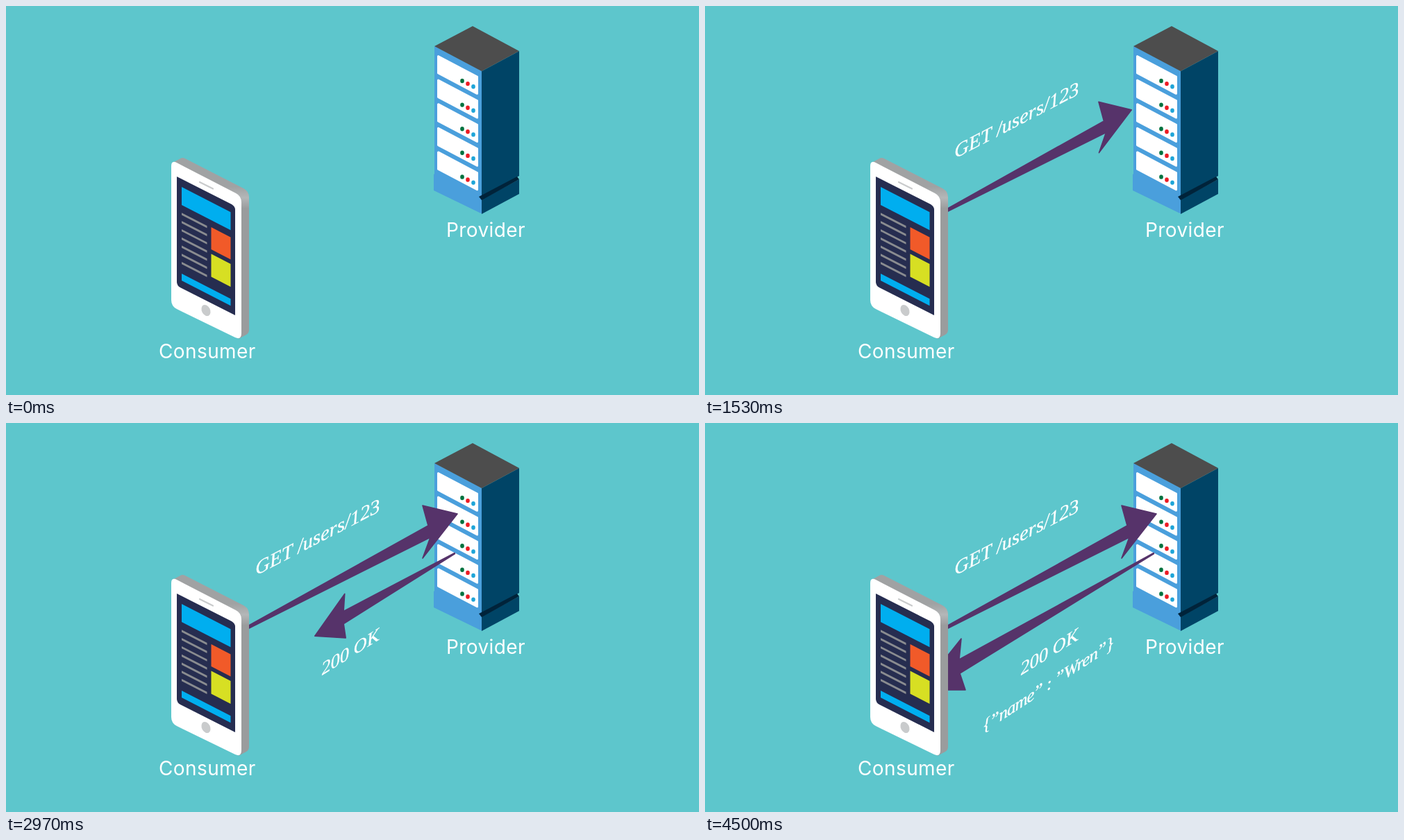
Animation, 998 px wide and 561 px high, one loop 5400 ms. Source, as an HTML page:

```html
<!DOCTYPE html>
<html lang="en">
<head>
<meta charset="utf-8">
<title>Consumer and provider</title>
<style>
  html, body { margin: 0; height: 100%; overflow: hidden; background: #5dc6cc; }
  svg { display: block; width: 100%; height: 100%; }
  .label { font: 400 28px Inter, sans-serif; letter-spacing: .4px; fill: #fff; }
  .note {
    font-family: "Liberation Serif", serif; font-style: italic; white-space: pre;
    fill: #fff; stroke: #fff; stroke-width: .35;
  }
  .arrow { fill: #56336a; stroke: #56336a; stroke-width: 1.6; stroke-linejoin: round; }
</style>
</head>
<body>
<svg viewBox="0 0 998 561">
  <defs>
    <linearGradient id="edge" x1="0" y1="0" x2="0" y2="1">
      <stop offset="0" stop-color="#a0a2a3"/>
      <stop offset=".16" stop-color="#a0a2a3"/>
      <stop offset=".22" stop-color="#b4b7b8"/>
      <stop offset=".28" stop-color="#9a9c9d"/>
      <stop offset="1" stop-color="#9a9c9d"/>
    </linearGradient>
    <clipPath id="clip0"><rect y="0" height="561"/></clipPath>
    <clipPath id="clip1"><rect y="0" height="561"/></clipPath>
    <clipPath id="clip2"><rect y="0" height="561"/></clipPath>
  </defs>

  <g id="server">
    <path fill="#4a9fdc" d="M617 58L686 94V300L616 266V243L617 242Z"/>
    <path fill="#004466" d="M685 94L739 65V245L685 275Z"/>
    <path fill="#4d4d4d" d="M672 29L739 65L685 94L617 58Z"/>
    <path fill="#004466" d="M685 279L739 250V271L685 300Z"/>
    <path fill="#00233a" d="M681 275L736 246L739 250L685 280Z"/>
  </g>

  <path id="request" class="arrow"/>
  <path id="reply" class="arrow"/>

  <g id="phone">
    <path fill="url(#edge)" d="M240 226L251 220Q254 218 258 220L342 263Q350 267 350 276V467Q350 472 346 474L335 480Z"/>
    <path fill="#fff" d="M238 231Q238 222 246 226L331 270Q339 274 339 283V472Q339 482 330 478L246 437Q238 433 238 424Z"/>
    <path fill="#262d50" d="M246 246L325 286Q330 289 330 294V446L251 406Q246 403 246 398Z"/>
    <path stroke="#c9cbcc" stroke-width="2.2" stroke-linecap="round" d="M279 254L298 263.5"/>
    <ellipse cx="288" cy="439" rx="6" ry="8.5" fill="#c9cbcc" transform="rotate(-26 288 439)"/>
  </g>

  <text class="label" x="220" y="507.5">Consumer</text>
  <text class="label" x="634" y="332.5">Provider</text>

  <g clip-path="url(#clip0)"><text class="note" font-size="28.5" transform="translate(360 220) skewY(-27.5) skewX(5)">GET /users/123</text></g>
  <g clip-path="url(#clip1)"><text class="note" font-size="26.5" transform="translate(455 364) skewY(-32) skewX(5)">200 OK</text></g>
  <g clip-path="url(#clip2)"><text class="note" font-size="25" letter-spacing="-1" transform="translate(402 445) skewY(-33) skewX(5)">{”name” : ”Wren”}</text></g>
</svg>

<script>
const LOOP = 5400;
const $ = id => document.getElementById(id);
const lerp = (a, b, k) => a + (b - a) * k;
const clamp = v => Math.max(0, Math.min(1, v));

function add(parent, tag, attrs) {
  const el = document.createElementNS("http://www.w3.org/2000/svg", tag);
  for (const key in attrs) el.setAttribute(key, attrs[key]);
  $(parent).append(el);
}

// Parallelogram whose horizontal edges follow the isometric slope.
function panel(parent, x, y, w, h, fill, round = 0) {
  const r = round / 2, d = w * 0.514;
  add(parent, "path", {
    d: `M${x + r} ${y + r}L${x + w - r} ${y + d + r / 2}V${y + d + h - r}L${x + r} ${y + h - r / 2}Z`,
    fill, stroke: round ? fill : "none", "stroke-width": round, "stroke-linejoin": "round"
  });
}

for (let i = 0; i < 5; i++) {
  const y = i * 34.6;
  panel("server", 621, 71 + y, 59, 26.5, "#fff", 3);
  ["#00723f", "#ed1c24", "#1ea5d8"].forEach((fill, j) =>
    add("server", "ellipse", { cx: 657 + j * 8, cy: 108 + j * 4.1 + y, rx: 2.8, ry: 3.2, fill }));
}

panel("phone", 253, 261, 70.5, 26, "#00aeef");
panel("phone", 295.5, 319, 28, 32, "#f15a29");
panel("phone", 295.5, 357.5, 28, 33, "#d7df23");
panel("phone", 253, 386, 70.5, 10, "#00aeef");
for (let i = 0; i < 7; i++) panel("phone", 253, 298.3 + i * 11.8, 36.5, 3.2, "#8a8c90");

// Tip positions: time, x, y. The last leg slows to a stop.
const requestPath = [[330, 347, 290], [690, 427, 248], [1530, 614, 150], [1860, 650, 131]];
const replyPath = [[2040, 647, 187], [2400, 569, 239], [2970, 445, 307], [3390, 340, 367], [3675, 310, 385]];

// Head outlines relative to the tip, small and large.
const requestHead = [
  [[-28, 11], [-33, -10], [0, 0], [-30, 50], [-25, 25]],
  [[-42, 17], [-50, -12], [0, 0], [-50, 64], [-39, 34]]
];
const replyHead = [
  [[24, -26], [24, -45], [0, 0], [20, 6], [23, -10]],
  [[56, -44], [59, -74], [0, 0], [65, 0], [57, -24]]
];

function tipAt(path, t) {
  const last = path.length - 1;
  if (t >= path[last][0]) return path[last].slice(1);
  const i = Math.max(1, path.findIndex(p => t < p[0]));
  const [t0, x0, y0] = path[i - 1], [t1, x1, y1] = path[i];
  let k = clamp((t - t0) / (t1 - t0));
  if (i === last) k = 1 - (1 - k) ** 2;
  return [lerp(x0, x1, k), lerp(y0, y1, k)];
}

function drawArrow(el, start, t, tip, heads, grow, scale, tail) {
  el.style.display = t > start ? "" : "none";
  const head = heads[0].map((p, i) =>
    [0, 1].map(c => tip[c] + scale * lerp(p[c], heads[1][i][c], grow)));
  const [first, second] = tail;
  el.setAttribute("d", "M" + [first, ...head, second].map(p => p.join(" ")).join("L") + "Z");
}

// Text wipes: start, end, left, right.
const wipes = [[520, 1340, 358, 546], [2600, 2960, 452, 545], [3000, 3370, 398, 596]];
const masks = wipes.map((w, i) => {
  const rect = document.querySelector(`#clip${i} rect`);
  rect.setAttribute("x", w[2]);
  return rect;
});

function draw(t) {
  const a = tipAt(requestPath, t);
  const growA = (a[0] - 427) / 223;
  const half = 2 + 3 * Math.max(0, 1 - growA) ** 2;
  drawArrow($("request"), 330, t, a, requestHead, growA, 1,
    [[346, 296 - half], [346, 296 + half]]);

  const b = tipAt(replyPath, t);
  drawArrow($("reply"), 2040, t, b, replyHead, Math.min(1, (569 - b[0]) / 229),
    clamp((647 - b[0]) / 40), [[646, 187.5], [646.5, 188.5]]);

  wipes.forEach(([start, end, left, right], i) =>
    masks[i].setAttribute("width", (right - left) * clamp((t - start) / (end - start))));
}

function tick() {
  draw(performance.now() % LOOP);
  requestAnimationFrame(tick);
}
tick();
</script>
</body>
</html>
```
